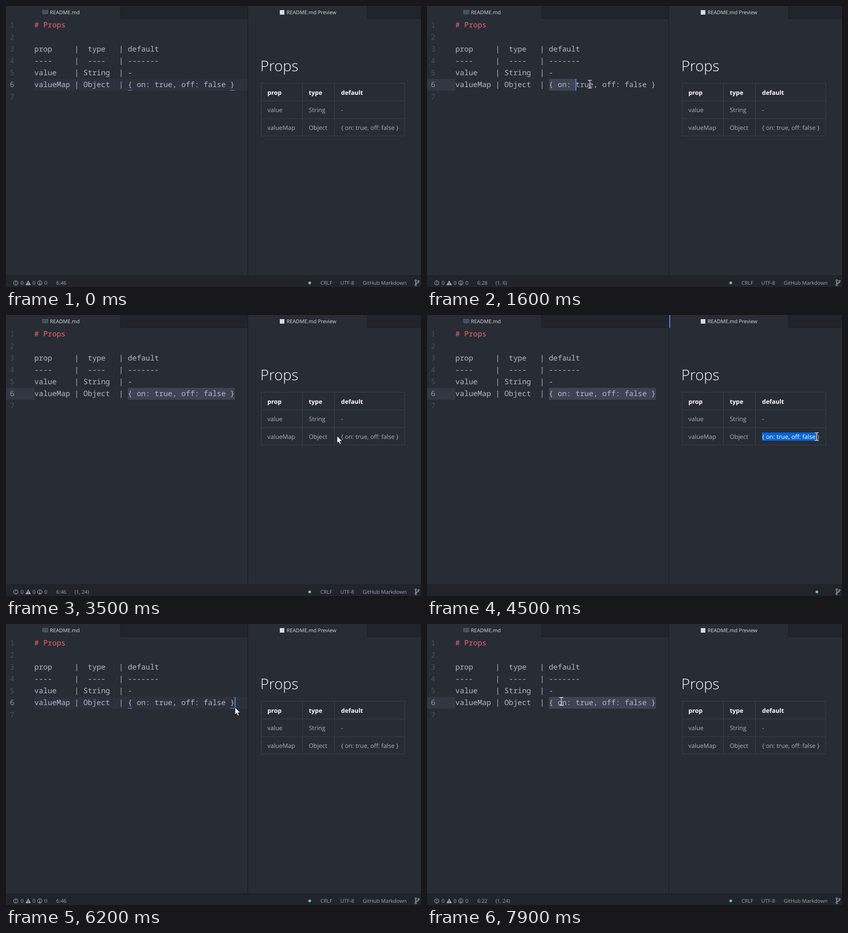
Recreate the animation shown at these times as an HTML page. Size 908x617 px, loop 8 s.

```html
<!DOCTYPE html>
<html lang="en">
<head>
<meta charset="utf-8">
<title>Markdown table editing</title>
<style>
  html, body { margin: 0; width: 100%; height: 100%; overflow: hidden; background: #282c34; }
  svg { display: block; width: 908px; height: 617px; }
  text { white-space: pre; text-rendering: geometricPrecision; font-variant-ligatures: none; }
  .ui { font: 11.25px "Open Sans", "Noto Sans", sans-serif; fill: #9da5b4; }
  .tab { fill: #d7dae0; }
  .code { font: 16.24px "Noto Sans Mono", "DejaVu Sans Mono", monospace; fill: #b4bbc8; }
  .num { fill: #495162; }
  .now { fill: #8f96a3; }
  .red { fill: #e8686f; }
  .cell { font: 13.3px "Open Sans", "Noto Sans", sans-serif; fill: #abb2bf; }
  .head { font-weight: 700; fill: #fff; }
  .title { font: 300 32px "Open Sans", "Noto Sans", sans-serif; fill: #fff; }
  .bar { fill: #21252b; }
  .edge { fill: #181a1f; }
  .grid { stroke: #3e434d; fill: none; }
  .icon { stroke: #9da5b4; fill: none; stroke-width: 1.2; }
  .book { stroke: #6c8ea4; fill: none; stroke-width: .9; }
  .blue { fill: #528bff; }
</style>
</head>
<body>
<svg viewBox="0 0 908 617">
  <defs>
    <clipPath id="picked"><rect id="pickedBox" x="733" y="258" width="0" height="18"/></clipPath>
  </defs>
  <rect width="908" height="617" fill="#282c34"/>

  <!-- tabs and panes -->
  <path class="bar" d="M251 0H529V27H251zM791 0H908V27H791z"/>
  <path class="edge" d="M250 0h1v28h-1zM250 27H529v1H250zM528.5 0h1.2v593h-1.2zM790 0h1v28h-1zM790 27H908v1H790z"/>
  <rect id="focusMark" class="blue" x="530" width="2" height="28"/>
  <path class="book" d="M80 9.5h4.6l1.2.8 1.2-.8h4.5v7.5H87l-1.2.8-1.2-.8H80zM85.8 10.3v7.5M81.6 11.7h2.6M81.6 13.4h2.6M81.6 15.1h2.6M87.4 11.7h2.6M87.4 13.4h2.6M87.4 15.1h2.6"/>
  <text class="ui tab" x="96" y="18">README.md</text>
  <rect x="599" y="9" width="10" height="10" fill="#d7dae0"/>
  <text class="ui tab" x="614" y="18">README.md Preview</text>

  <!-- editor -->
  <rect id="line" x="62" y="160" width="466" height="26" fill="#2c313c"/>
  <rect id="gutter" y="160" width="62" height="26" fill="#323741"/>
  <rect id="sel" y="160" height="26" fill="#3e4451"/>
  <g id="code"></g>
  <path id="braces" class="blue" d="M266.5 184.5h9.7v1.2h-9.7zM490.5 184.5h9.7v1.2h-9.7z"/>
  <rect id="caret" class="blue" y="160" width="2" height="26"/>

  <!-- preview -->
  <text class="title" x="556.5" y="143">Props</text>
  <path class="grid" d="M558.5 169.5H872.5V285.5H558.5zM558.5 208.5H872.5M558.5 247.5H872.5M648.5 169.5V285.5M718.5 169.5V285.5"/>
  <g id="cells"></g>
  <g clip-path="url(#picked)">
    <rect x="733" y="258" width="126" height="18" fill="#0564d8"/>
    <text class="cell" x="733" y="272" style="fill:#fff">{ on: true, off: false }</text>
  </g>

  <!-- status bar -->
  <rect class="bar" y="593" width="908" height="24"/>
  <rect class="edge" y="592" width="908" height="1"/>
  <g id="status">
    <circle class="icon" cx="21.5" cy="608" r="4.7"/>
    <path class="icon" d="M21.5 605v3.6M21.5 609.8v1.4"/>
    <path d="M48.5 602.5L54.5 613H42.5z" fill="#9da5b4"/>
    <path d="M48.5 606v3.6M48.5 610.6v1.3" stroke="#21252b" stroke-width="1.2"/>
    <circle class="icon" cx="74" cy="608" r="4.7"/>
    <path class="icon" d="M74 604.8v1.4M73 607.6h1v3.2M72.6 610.9h2.9"/>
    <text class="ui" x="32" y="612">0</text>
    <text class="ui" x="58" y="612">0</text>
    <text class="ui" x="84" y="612">0</text>
    <text class="ui" id="pos" x="110" y="612"></text>
    <text class="ui" id="count" x="150" y="612"></text>
    <text class="ui" x="688" y="612">CRLF</text>
    <text class="ui" x="731.5" y="612">UTF-8</text>
    <text class="ui" x="780.5" y="612">GitHub Markdown</text>
  </g>
  <circle id="dot" cy="608" r="3" fill="#73c990"/>
  <g class="icon">
    <circle cx="896.5" cy="602.8" r="1.7"/>
    <circle cx="896.5" cy="612.6" r="1.7"/>
    <circle cx="902.5" cy="604.3" r="1.7"/>
    <path d="M896.5 604.5V611M902.5 606c0 3-5.5 2-6 4.5" stroke-width="1.7"/>
  </g>

  <!-- pointer -->
  <path id="arrow" d="M0 0V16.2L3.7 12.8 6.2 18.6 9 17.4 6.5 11.8H11.6z" fill="#fff" stroke="#111"/>
  <path id="beam" d="M-4.5-8.5H-1Q0-8.5 0-7.5Q0-8.5 1-8.5H4.5M0-7.5V7.5M-4.5 8.5H-1Q0 8.5 0 7.5Q0 8.5 1 8.5H4.5" fill="none" stroke="#f4f1e6" stroke-width="1.3"/>
</svg>
<script>
const LOOP = 8000, STEP = 100;
const LEFT = 62, ADV = 9.744, START = 21, END = 45;
const $ = id => document.getElementById(id);
const show = (id, on) => $(id).setAttribute("visibility", on ? "visible" : "hidden");
const set = (id, name, value) => $(id).setAttribute(name, value);
const within = (t, a, b) => t >= a && t < b;
const clamp = (v, lo, hi) => Math.max(lo, Math.min(hi, v));
const smooth = p => p * p * (3 - 2 * p);
const quick = p => 1 - (1 - p) ** 2;

function addText(parent, cls, x, y, str) {
  const el = document.createElementNS("http://www.w3.org/2000/svg", "text");
  el.setAttribute("class", cls);
  el.setAttribute("x", x);
  el.setAttribute("y", y);
  el.textContent = str;
  $(parent).append(el);
}

[
  "# Props",
  "",
  "prop     |  type   | default",
  "----     |  ----   | -------",
  "value    | String  | -",
  "valueMap | Object  | { on: true, off: false }",
  ""
].forEach((str, i) => {
  const y = 47.3 + i * 26.22;
  addText("code", i === 5 ? "code now" : "code num", 8.5, y, i + 1);
  addText("code", i ? "code" : "code red", LEFT, y, str);
});

[
  ["prop", "type", "default"],
  ["value", "String", "-"],
  ["valueMap", "Object", "{ on: true, off: false }"]
].forEach((row, r) => row.forEach((str, c) =>
  addText("cells", r ? "cell" : "cell head", [572, 662.5, 733][c], 194.5 + r * 38.75, str)));

// each move runs from the previous place, with a downward bow
const moves = [
  { from: 100, to: 900, x: 272, y: 172, bow: 95, ease: smooth },
  { from: 1400, to: 2400, x: 506, y: 171, bow: 0, ease: quick },
  { from: 2800, to: 3600, x: 734, y: 268, bow: 12, ease: smooth },
  { from: 3800, to: 4600, x: 858, y: 267, bow: 0, ease: smooth },
  { from: 5000, to: 5400, x: 877, y: 263, bow: -4, ease: smooth },
  { from: 5500, to: 5900, x: 466, y: 192, bow: 0, ease: smooth },
  { from: 5900, to: 6000, x: 501, y: 183, bow: 0, ease: smooth },
  { from: 6200, to: 6500, x: 503, y: 171, bow: 0, ease: smooth },
  { from: 6700, to: 7200, x: 272, y: 171, bow: 0, ease: quick },
  { from: 7700, to: 7900, x: 294, y: 170, bow: 0, ease: smooth }
];

function pointer(t) {
  let x = 893, y = 52;
  for (const m of moves) {
    if (t < m.from) break;
    const p = m.ease(clamp((t - m.from) / (m.to - m.from), 0, 1));
    x += (m.x - x) * p;
    y += (m.y - y) * p + m.bow * Math.sin(Math.PI * p);
  }
  return { x, y };
}

// the selection trails the pointer a little and stays after each drag
function headColumn(t) {
  const out = within(t, 1400, 6200), back = t >= 6700;
  if (!out && !back) return END;
  const { x } = pointer(Math.min(t, out ? 2700 : 7500) - 75);
  return clamp(Math.floor((x - LEFT) / ADV), START, END);
}

function caretOn(t) {
  if (within(t, 1400, 2300) || within(t, 6700, 7400)) return true;
  const reset = [7400, 6200, 2300, 100].find(r => r <= t);
  return (t - reset) % 800 < 400;
}

function draw(t) {
  const preview = within(t, 3800, 6200);
  const anchor = within(t, 1400, 6200) ? START : END;
  const head = headColumn(t);
  const size = Math.abs(head - anchor);
  const { x, y } = pointer(t);

  show("line", !size);
  show("braces", !size);
  show("gutter", size);
  set("sel", "x", LEFT + Math.min(head, anchor) * ADV);
  set("sel", "width", size * ADV);
  set("caret", "x", LEFT + head * ADV - .3);
  show("caret", !preview && caretOn(t));

  show("focusMark", preview);
  show("status", !preview);
  set("dot", "cx", preview ? 853 : 664.5);
  $("pos").textContent = "6:" + (head + 1);
  $("count").textContent = size ? `(1, ${size})` : "";
  set("pickedBox", "width", preview ? pointer(Math.min(t, 5000)).x - 733 : 0);

  const beam = within(t, 3600, 5200) || (x < 528 && !within(t, 3800, 6300));
  for (const id of ["arrow", "beam"]) set(id, "transform", `translate(${x} ${y})`);
  show("beam", beam);
  show("arrow", !beam && t >= 100);
}

const began = performance.now();
function tick() {
  const t = (performance.now() - began) % LOOP;
  draw(Math.floor(t / STEP) * STEP);
  requestAnimationFrame(tick);
}
draw(0);
requestAnimationFrame(tick);
</script>
</body>
</html>
```
